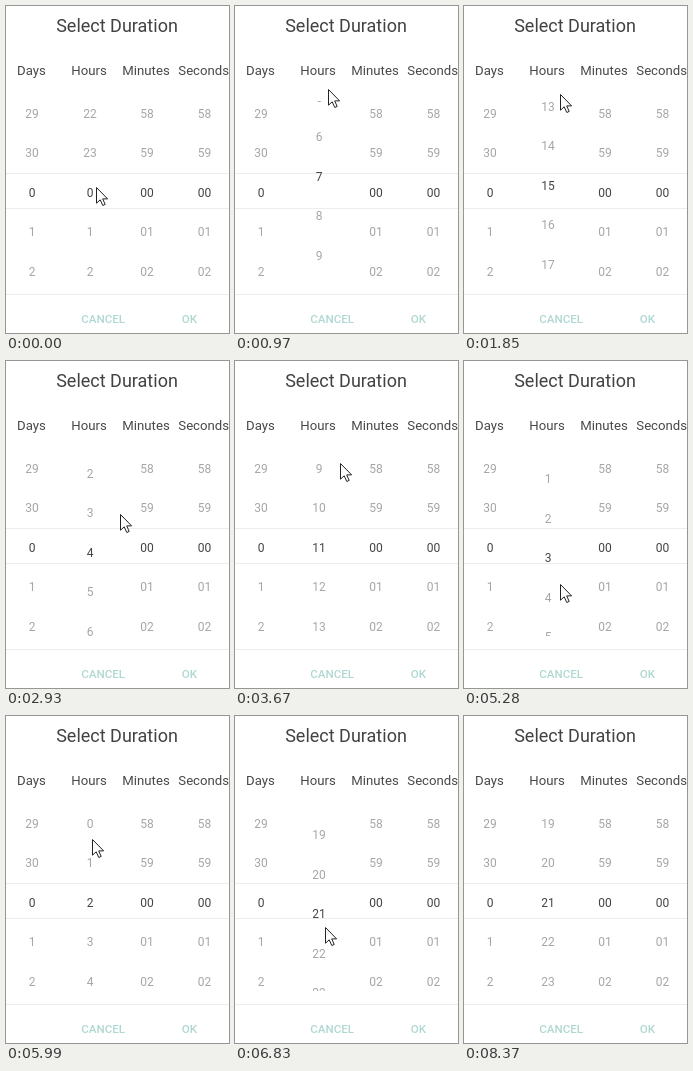
Animation of 223 by 327 pixels, one loop 8.9 s. Source, as an HTML page:

```html
<!DOCTYPE html>
<html lang="en">
<head>
<meta charset="utf-8">
<title>Select Duration</title>
<style>
  html, body { margin: 0; width: 100%; height: 100%; overflow: hidden; background: #fff; }
  svg { display: block; width: 100%; height: 100%; }
  text { font-family: Roboto, sans-serif; text-anchor: middle; }
  .title { font-size: 18px; fill: #424242; }
  .head { font-size: 13.2px; fill: #484848; }
  .num { font-size: 12px; fill: #a6a6a6; }
  .num.on { fill: #444; }
  .btn { font-size: 11.6px; font-weight: 500; fill: #b0d8d2; }
  .line { fill: #ececec; }
</style>
</head>
<body>
<svg viewBox="0 0 223 327">
  <clipPath id="window"><rect y="95" width="223" height="180"/></clipPath>
  <rect width="223" height="327" fill="#fff"/>
  <text class="title" x="111" y="26">Select Duration</text>
  <rect class="line" y="167" width="223" height="1"/>
  <rect class="line" y="202" width="223" height="1"/>
  <rect class="line" y="288" width="223" height="1"/>
  <g id="heads"></g>
  <g id="wheels" clip-path="url(#window)"></g>
  <text class="btn" x="97.2" y="317">CANCEL</text>
  <text class="btn" x="183.5" y="317">OK</text>
  <path id="cursor" d="M.5 .5V16.2L4.2 12.8L6.8 18.5L9.2 17.4L6.7 11.9H11.6Z"
        fill="#fff" stroke="#222" stroke-width="1"/>
</svg>
<script>
const LOOP = 8900, PITCH = 39.5, MID = 190.6, REACH = 3, DRAG = 320;

const COLUMNS = [
  { name: 'Days', x: 26, headX: 25.5, size: 31 },
  { name: 'Hours', x: 84, headX: 83, size: 24 },
  { name: 'Minutes', x: 141, headX: 140, size: 60, pad: 2 },
  { name: 'Seconds', x: 198.5, headX: 197.7, size: 60, pad: 2 }
];
const hours = COLUMNS[1];

// Each flick drags the pointer and spins the hours wheel to a slow stop.
const FLICKS = [
  { at: 410, span: 970, by: 8, from: [88, 188], to: [95, 54] },
  { at: 1597, span: 970, by: 12, from: [85, 205], to: [99, 58] },
  { at: 2718, span: 970, by: 15, from: [100, 255], to: [121, 102] },
  { at: 4398, span: 1554, by: -9, from: [85, 102], to: [103, 287] },
  { at: 6050, span: 600, by: -5.3, from: [86, 122], to: [97, 277] },
  { at: 6830, span: 420, by: 0.3, from: [90, 211], to: [115, 250] }
];

// Pointer stops: arrival, enter, every flick, then leave by the corner
const STOPS = [
  { t: 0, p: [90, 181] },
  { t: 240, p: [90, 181] },
  { t: 250, p: [88, 188] },
  ...FLICKS.flatMap(f => [{ t: f.at, p: f.from, drag: true }, { t: f.at + DRAG, p: f.to }]),
  { t: 7910, p: [115, 244] },
  { t: 8130, p: [118, 243] },
  { t: 8370, p: [223, 330] }
];

const clamp = u => Math.min(1, Math.max(0, u));
const easeOut = u => 1 - (1 - u) ** 3;
const smooth = u => u * u * (3 - 2 * u);
const byId = id => document.getElementById(id);

function addText(parent, cls, x, y, label = '') {
  const el = document.createElementNS('http://www.w3.org/2000/svg', 'text');
  el.setAttribute('class', cls);
  el.setAttribute('x', x);
  el.setAttribute('y', y);
  el.textContent = label;
  parent.append(el);
  return el;
}

function wheelAt(t) {
  return FLICKS.reduce((sum, f) => sum + f.by * easeOut(clamp((t - f.at) / f.span)), 0);
}

function pointerAt(t) {
  const i = STOPS.findIndex(s => s.t > t);
  if (i < 0) return STOPS[STOPS.length - 1].p;
  const a = STOPS[i - 1], b = STOPS[i];
  const u = (t - a.t) / (b.t - a.t);
  const k = a.drag ? u : smooth(u);
  return a.p.map((v, n) => Math.round(v + (b.p[n] - v) * k));
}

function turn(col, value) {
  const near = Math.round(value);
  col.rows.forEach((row, i) => {
    const n = near + i - REACH;
    const label = ((n % col.size) + col.size) % col.size;
    row.textContent = String(label).padStart(col.pad || 1, '0');
    row.setAttribute('y', (MID + (n - value) * PITCH).toFixed(2));
    row.classList.toggle('on', n === near);
  });
}

function draw(t) {
  turn(hours, wheelAt(t));
  byId('cursor').setAttribute('transform', `translate(${pointerAt(t).join(' ')})`);
}

for (const col of COLUMNS) {
  addText(byId('heads'), 'head', col.headX, 68.6, col.name);
  col.rows = Array.from({ length: 2 * REACH + 1 },
    () => addText(byId('wheels'), 'num', col.x, 0));
  turn(col, 0);
}

const start = performance.now();
function tick() {
  draw((performance.now() - start) % LOOP);
  requestAnimationFrame(tick);
}
tick();
</script>
</body>
</html>
```
